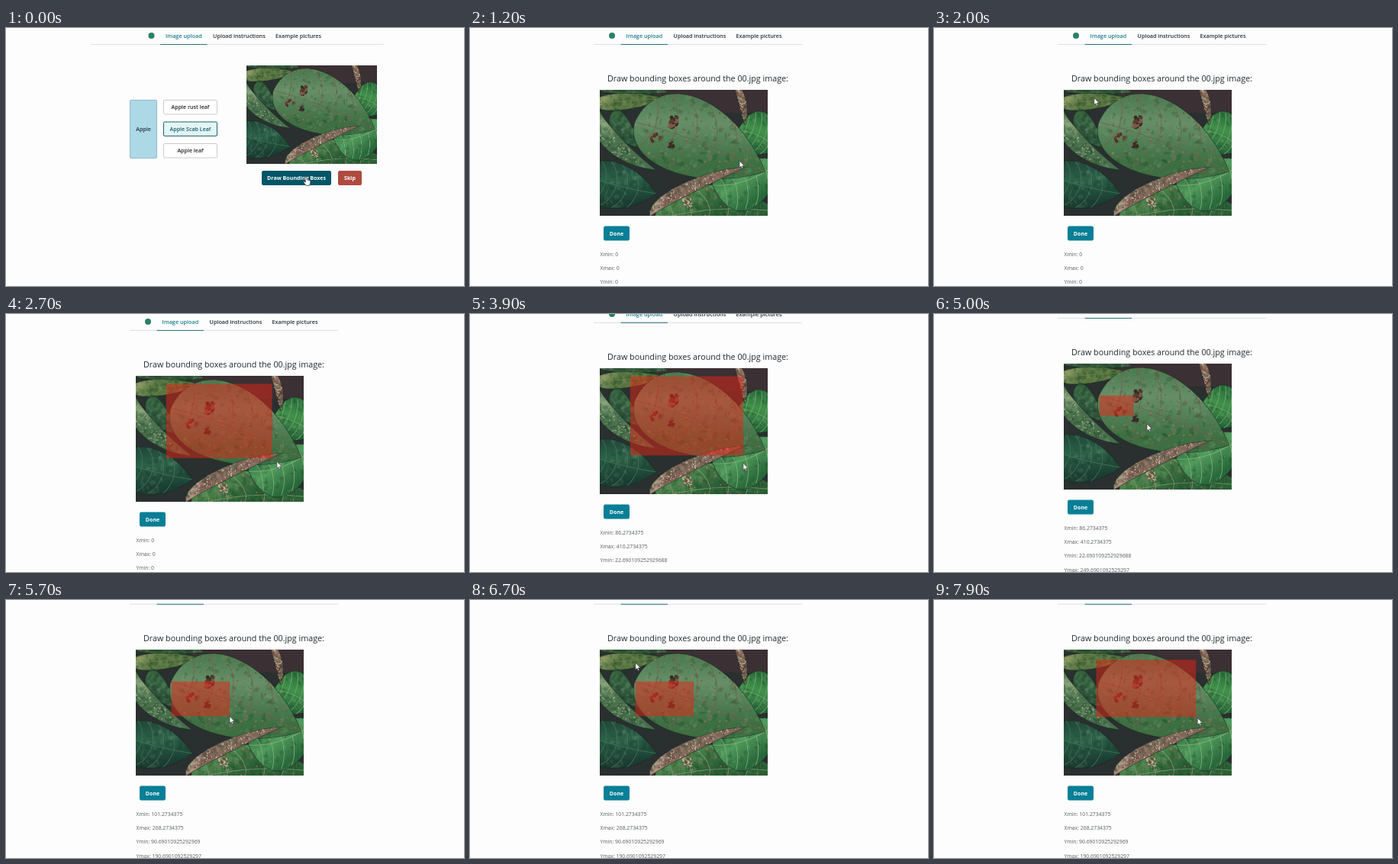
Animation of 600 by 338 pixels, one loop 8000 ms. Source, as an HTML page with a canvas:

```html
<!DOCTYPE html>
<html lang="en">
<head>
<meta charset="utf-8">
<title>Bounding box tool</title>
<style>
  html, body { margin: 0; width: 100%; height: 100%; overflow: hidden; background: #fdfdfd; }
  canvas { display: block; }
</style>
</head>
<body>
<canvas id="stage" width="600" height="338"></canvas>
<script>
const LOOP = 8000, STEP = 100, PAGE_SWITCH = 300, POINTER_LAG = 75;
const FONT = '"Open Sans", "Noto Sans", sans-serif';
const PHOTO = { x: 170, y: 81, w: 220, h: 165, scale: 0.457 };
const ctx = document.getElementById('stage').getContext('2d');

// ---------- photo, painted once at double size ----------
const photo = paintPhoto();

function paintPhoto() {
  const canvas = document.createElement('canvas');
  canvas.width = PHOTO.w * 2;
  canvas.height = PHOTO.h * 2;
  const g = canvas.getContext('2d');
  g.scale(2, 2);
  let seed = 11;
  const random = () => (seed = (seed * 16807) % 2147483647) / 2147483647;

  function spots(count, size, colors, place) {
    for (let i = 0; i < count; i++) {
      const [x, y] = place();
      g.fillStyle = colors[i % colors.length];
      g.beginPath();
      g.ellipse(x, y, size * (.4 + random()), size * (.3 + random() * .5), random() * 3, 0, 7);
      g.fill();
    }
  }

  // Leaf from base to tip; `up` and `down` are how far its two edges bulge from that line.
  function leaf(x0, y0, x1, y1, up, down, dark, light, veins = '', blight = []) {
    const length = Math.hypot(x1 - x0, y1 - y0), middle = (down - up) / 2;
    const anywhere = () => [random() * length, -up + random() * (up + down)];
    g.save();
    g.translate(x0, y0);
    g.rotate(Math.atan2(y1 - y0, x1 - x0));
    g.beginPath();
    g.moveTo(0, 0);
    g.bezierCurveTo(length * .03, -up, length * .6, -up, length, 0);
    g.bezierCurveTo(length * .6, down, length * .03, down, 0, 0);
    const shade = g.createLinearGradient(0, -up * .75, length * .2, down * .75);
    [dark, light, dark].forEach((color, i) => shade.addColorStop(i / 2, color));
    g.fillStyle = shade;
    g.fill();
    g.strokeStyle = 'rgba(20, 40, 30, .5)';
    g.lineWidth = 1;
    g.stroke();
    g.clip();
    spots(length * 1.2, 4, ['rgba(150, 180, 140, .13)', 'rgba(15, 50, 25, .2)'], anywhere);
    if (veins) {
      g.strokeStyle = veins;
      g.lineWidth = .8;
      g.beginPath();
      g.moveTo(0, 0);
      g.quadraticCurveTo(length * .45, middle, length, 0);
      for (let k = .15; k < .9; k += .15) {
        const y = 2 * k * (1 - k) * middle;
        for (const edge of [-up, down]) {
          g.moveTo(length * k, y);
          g.quadraticCurveTo(length * (k - .02), edge * .5, length * (k - .14), edge * .7);
        }
      }
      g.stroke();
    }
    if (blight.length) spots(length * 2.2, 1.1, blight, anywhere);
    g.restore();
  }
  const rust = ['#946354', '#754b3d', '#aa7d62'];
  const dry = ['#c9aa9c', '#6c4b40', '#dbc0af', '#8d6656'];

  g.fillStyle = '#29302f';
  g.fillRect(0, 0, PHOTO.w, PHOTO.h);
  g.fillStyle = '#3b3033';
  g.fillRect(70, 0, 150, 30);

  leaf(-20, 112, 74, 136, 36, 46, '#1b3d33', '#2c6148', '#44735b');
  leaf(-10, -5, 90, 3, 20, 10, '#34573b', '#547448');
  leaf(-10, 18, 84, 11, 14, 15, '#56753f', '#8c9c63', '#6f7e50');
  leaf(20, 26, 52, 76, 10, 24, '#2a5139', '#3d6b45');
  leaf(0, 24, 74, 105, -8, 40, '#486f4c', '#86a177', '', ['#a5ae88', '#4f7950']);
  leaf(72, 172, 235, 160, 58, 20, '#2a5f36', '#4b854c', '#79a06f', rust);
  leaf(181, 53, 235, 78, 48, 28, '#246438', '#42914b', '#71a86d');
  leaf(148, 125, 238, 92, 24, 62, '#28673a', '#529c5d', '#82b37b');
  leaf(46, 42, 217, 107, 78, 58, '#3c6f42', '#668f68', '#735f4b', rust);
  leaf(66, 166, 192, 101, 25, -3, '#83655a', '#b69685', '', dry);
  leaf(176, -4, 190, 46, 14, 0, '#745248', '#a27a69', '', dry);

  // holes and dry patches
  const around = (x, y, r) => () => [x + (random() - .5) * r, y + (random() - .5) * r];
  spots(18, 4, ['#382b29', '#5d3c32', '#7d5a44'], around(96, 42, 12));
  spots(9, 3, ['#4f302b', '#6b3c30'], around(73, 62, 13));
  spots(8, 3, ['#392c2a'], around(93, 72, 7));
  spots(24, 2, dry, around(115, 147, 13));
  return canvas;
}

// ---------- motion ----------
const FIRST = { x: 392, y: 195 };
const drags = [
  { approach: 1200, start: 2100, end: 2800, x: 86, y: 22, w: 324, h: 227 },
  { approach: 3900, start: 4800, end: 5150, x: 101, y: 90, w: 167, h: 100 },
  { approach: 6200, start: 7000, end: 7950, x: 92, y: 28, w: 291, h: 167 }
];

function ease(t, start, end) {
  const k = Math.min(1, Math.max(0, (t - start) / (end - start)));
  return k * (2 - k);
}
const scrollAt = t => 10 * ease(t, 2800, 3300) + 6 * ease(t, 3900, 4700);

function corner(drag, k) {
  return {
    x: PHOTO.x + .5 + (drag.x + drag.w * k) * PHOTO.scale,
    y: PHOTO.y + .5 + (drag.y + drag.h * k) * PHOTO.scale - scrollAt(drag.start)
  };
}
const moves = [
  { start: PAGE_SWITCH, end: 800, to: { x: 353, y: 174 } },
  ...drags.flatMap(d => [
    { start: d.approach, end: d.start - 150, to: corner(d, 0) },
    { start: d.start, end: d.end, to: corner(d, 1) }
  ])
];
function pointerAt(t) {
  return moves.reduce((p, { start, end, to }) => {
    const k = ease(t, start, end);
    return { x: p.x + (to.x - p.x) * k, y: p.y + (to.y - p.y) * k };
  }, FIRST);
}

function readings(t) {
  const d = drags.findLast(d => d.end <= t);
  if (!d) return { Xmin: 0, Xmax: 0, Ymin: 0, Ymax: 0 };
  const left = d.x + 70 / 256, top = d.y + 45227 / 65536; // fractional page offset
  return { Xmin: left, Xmax: left + d.w, Ymin: top, Ymax: top + d.h };
}

// ---------- interface ----------
function label(text, x, y, size, color, weight = 600, align = 'left') {
  ctx.font = `${weight} ${size}px ${FONT}`;
  ctx.fillStyle = color;
  ctx.textAlign = align;
  ctx.fillText(text, x, y);
}
function button(text, x, y, w, h, fill, color = '#fff', border = fill) {
  ctx.beginPath();
  ctx.roundRect(x + .5, y + .5, w - 1, h - 1, 1.5);
  ctx.fillStyle = fill;
  ctx.fill();
  ctx.strokeStyle = border;
  ctx.lineWidth = 1;
  ctx.stroke();
  label(text, x + w / 2, y + h / 2 + 2.7, 7.1, color, color === '#fff' ? 700 : 600, 'center');
}
function header(left, right, x) {
  ctx.fillStyle = '#dcdfe1';
  ctx.fillRect(left, 21, right - left, 1);
  ctx.fillStyle = '#2b7186';
  ctx.fillRect(x - 7, 21, 61.5, 1);
  ctx.fillStyle = '#2b8068';
  ctx.beginPath();
  ctx.arc(x - 18.5, 10, 4, 0, 7);
  ctx.fill();
  label('Image upload', x, 13, 7.25, '#1b7d90');
  label('Upload instructions', x + 62, 13, 7.25, '#25323a');
  label('Example pictures', x + 144, 13, 7.25, '#25323a');
}

function uploadPage() {
  header(111, 495, 209);
  button('Apple', 162, 94, 36, 77, '#add8e6', '#22323a', '#94bac7');
  ['Apple rust leaf', 'Apple Scab Leaf', 'Apple leaf'].forEach((name, i) => {
    const style = i === 1 ? ['#e2f6f4', '#18596a', '#1f6475'] : ['#fff', '#222', '#c8cacc'];
    button(name, 206, 94 + i * 28.5, 71, 19.5, ...style);
  });
  ctx.drawImage(photo, 314.5, 49, 171.5, 129);
  button('Draw Bounding Boxes', 335, 187, 91, 19, '#005567');
  button('Skip', 435, 187, 31, 19, '#b04a40');
}

function drawingPage(t) {
  ctx.save();
  ctx.translate(0, -scrollAt(t));
  header(162, 435, 204.5);
  label('Draw bounding boxes around the 00.jpg image:', 180, 69.5, 10.74, '#20292e', 500);
  ctx.drawImage(photo, PHOTO.x, PHOTO.y, PHOTO.w, PHOTO.h);

  const drag = drags.findLast(d => d.start <= t);
  if (drag) {
    const k = ease(t - POINTER_LAG, drag.start, drag.end);
    const { x, y } = corner(drag, 0);
    ctx.fillStyle = 'rgba(230, 36, 22, .5)';
    ctx.fillRect(x, y + scrollAt(drag.start), drag.w * k * PHOTO.scale, drag.h * k * PHOTO.scale);
  }

  button('Done', 175, 259.5, 34, 19, '#087f96');
  Object.entries(readings(t)).forEach(([name, value], i) =>
    label(`${name}: ${value}`, 170.5, 298.6 + i * 18.3, 6.85, '#565c60', 400));
  ctx.restore();
}

const arrow = new Path2D('M0 0V9.2L2.1 7.3L3.6 10.6L5 10L3.6 6.7H6.5Z');
const hand = new Path2D('M0 0Q1.2-1 1.9.3L2.3 4Q5.2 3.5 7 6L5.6 11.5H1.2L-1.5 8Q-2.8 6 -1.8 5.8L.3 7Z');

function pointer(t, shape) {
  const { x, y } = pointerAt(t);
  ctx.save();
  ctx.translate(x, y);
  ctx.lineWidth = .7;
  ctx.strokeStyle = '#333';
  ctx.fillStyle = '#fff';
  ctx.fill(shape);
  ctx.stroke(shape);
  ctx.restore();
}

function frame() {
  const t = Math.floor((performance.now() % LOOP) / STEP) * STEP;
  const uploading = t < PAGE_SWITCH;
  ctx.fillStyle = '#fdfdfd';
  ctx.fillRect(0, 0, 600, 338);
  uploading ? uploadPage() : drawingPage(t);
  pointer(t, uploading ? hand : arrow);
  requestAnimationFrame(frame);
}
frame();
</script>
</body>
</html>
```
